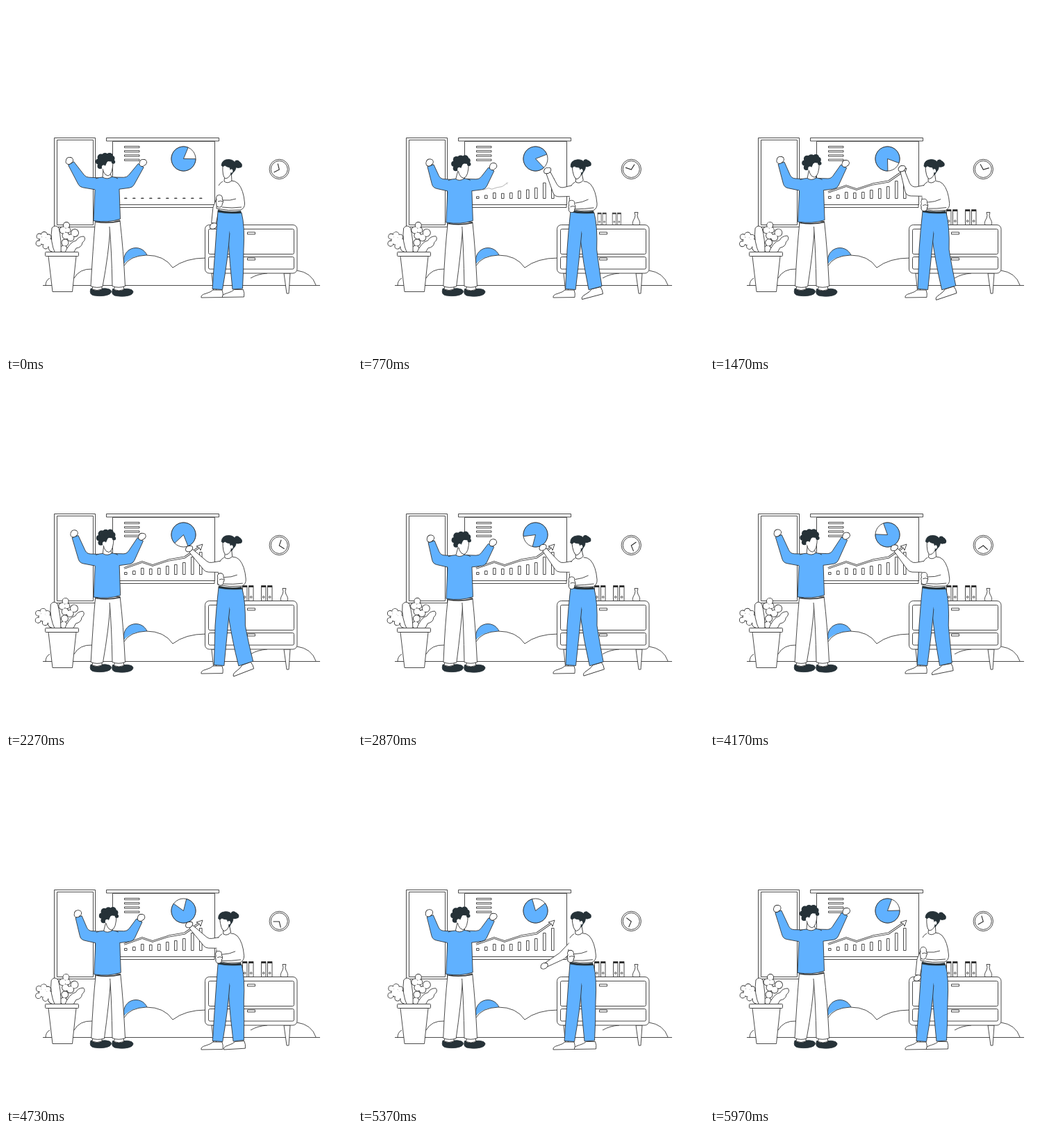
Animation of 498 by 500 pixels, one loop 6.01 s. Source, as an HTML page with a canvas:

```html
<!DOCTYPE html>
<html lang="en">
<head>
<meta charset="utf-8">
<title>Team presentation</title>
<style>
html, body { margin: 0; width: 100%; height: 100%; overflow: hidden; background: #fff; }
canvas { display: block; width: 498px; height: 500px; }
</style>
</head>
<body>
<canvas id="stage" width="498" height="500"></canvas>
<script>
const ctx = document.getElementById('stage').getContext('2d');
const LOOP = 6010, TAU = Math.PI * 2;
const BLUE = '#60b1ff', DARK = '#263238', INK = '#2c2c2c', WHITE = '#fff', LINE = .85;

const mix = (a, b, u) => a + (b - a) * u;
function ease(t, from, to) {
  const u = Math.min(1, Math.max(0, (t - from) / (to - from)));
  return u < .5 ? 2 * u * u : 1 - 2 * (1 - u) * (1 - u);
}
function keyed(t, keys) {
  let i = 1;
  while (i < keys.length - 1 && t > keys[i][0]) i++;
  const [t0, a] = keys[i - 1], [t1, b] = keys[i];
  return mix(a, b, Math.min(1, (t - t0) / (t1 - t0)));
}

function paint(fill, line = INK, width = LINE) {
  if (fill) { ctx.fillStyle = fill; ctx.fill(); }
  if (line) { ctx.strokeStyle = line; ctx.lineWidth = width; ctx.stroke(); }
}
function shape(d, fill, line, width = LINE) {
  const p = new Path2D(d);
  if (fill) { ctx.fillStyle = fill; ctx.fill(p); }
  if (line) { ctx.strokeStyle = line; ctx.lineWidth = width; ctx.stroke(p); }
}
function box(x, y, w, h, fill = WHITE, r = 0, width = LINE) {
  ctx.beginPath();
  ctx.roundRect(x, y, w, h, r);
  paint(fill, INK, width);
}
function oval(x, y, rx, ry = rx, fill = WHITE, line = INK) {
  ctx.beginPath();
  ctx.ellipse(x, y, rx, ry, 0, 0, TAU);
  paint(fill, line);
}
// Union of discs sharing one outline.
function lobes(list, fill = WHITE, line = INK) {
  for (const [x, y, r] of list) oval(x, y, r + .4, r + .4, line, null);
  for (const [x, y, r] of list) oval(x, y, r - .45, r - .45, fill, null);
}
function at(x, y, angle, scale, draw) {
  ctx.save();
  ctx.translate(x, y);
  ctx.rotate(angle);
  ctx.scale(scale, scale);
  ctx.translate(-x, -y);
  draw();
  ctx.restore();
}
function moved(x, y, draw) {
  ctx.save();
  ctx.translate(x, y);
  draw();
  ctx.restore();
}
// Tapered two-part limb through three joints.
function limb(a, b, c, widths, fill) {
  const unit = (p, q) => {
    const x = q[0] - p[0], y = q[1] - p[1], l = Math.hypot(x, y) || 1;
    return [-y / l, x / l];
  };
  const n1 = unit(a, b), n2 = unit(b, c);
  const sx = n1[0] + n2[0], sy = n1[1] + n2[1], sl = Math.hypot(sx, sy) || 1;
  const nb = [sx / sl * 1.15, sy / sl * 1.15];
  const off = (p, n, w, side) => [p[0] + n[0] * w / 2 * side, p[1] + n[1] * w / 2 * side];
  const [wa, wb, wc] = widths;
  ctx.beginPath();
  ctx.moveTo(...off(a, n1, wa, 1));
  ctx.arcTo(...off(b, nb, wb, 1), ...off(c, n2, wc, 1), 9);
  ctx.lineTo(...off(c, n2, wc, 1));
  ctx.lineTo(...off(c, n2, wc, -1));
  ctx.arcTo(...off(b, nb, wb, -1), ...off(a, n1, wa, -1), 9);
  ctx.lineTo(...off(a, n1, wa, -1));
  paint(fill);
}
function toward(p, q, d) {
  const x = q[0] - p[0], y = q[1] - p[1], l = Math.hypot(x, y);
  return [p[0] + x / l * d, p[1] + y / l * d];
}
function fist([x, y]) {
  lobes([[x, y, 4.6], [x - 1, y + 1.5, 4], [x + 1.5, y - .5, 4]]);
}

function room() {
  box(69.5, 189.5, 59, 128);
  box(73.5, 192.5, 52, 122);
  box(153.5, 194.5, 147, 91);
  shape('M153 289.5H300V285', null, INK);
  box(144.5, 189.5, 162, 4.5);
  for (let i = 0; i < 4; i++) box(170.5, 201.5 + i * 6.2, 21.5, 2.2);
}
function pie(turn) {
  const a = turn - TAU / 4 + .39, b = a + 1.19;
  oval(255.5, 219.5, 17.5);
  ctx.beginPath();
  ctx.moveTo(255.5, 219.5);
  ctx.arc(255.5, 219.5, 17.5, b, a + TAU);
  ctx.closePath();
  paint(BLUE);
}
function chart(t) {
  const grow = ease(t, 0, 1000);
  [3, 5, 9, 8, 9, 12, 14, 17, 25, 32].forEach((h, i) => {
    const tall = Math.max(.5, h * grow);
    box(170.5 + i * 12, 276.5 - tall, 3.6, tall);
  });
  const u = ease(t, 450, 1250);
  if (!u) return;
  ctx.globalAlpha = Math.min(1, u * 1.4);
  at(184, 263, 0, u, () => {
    const d = 'M170 267.5L196 258.5L211 263.5L234 256L257 252L280 236';
    ctx.lineJoin = 'round';
    shape(d, null, INK, 2.8);
    shape(d, null, WHITE, 1.3);
    shape('M274 236L283 233L280 242L278.5 238.5Z', WHITE, INK);
  });
  ctx.globalAlpha = 1;
}
function clock(turn) {
  oval(393.3, 234.5, 14.2);
  oval(393.3, 234.5, 12);
  at(393.3, 235, turn, 1, () => shape('M385.5 239L393.3 235L391.2 226.5', null, INK, 1.1));
}
function hills() {
  oval(187, 365, 17.5, 17.5, BLUE);
  shape('M168 402V373Q177 359 202 358Q228 358 240 376Q258 362 288 362V402Z', WHITE);
  shape('M170 373Q178 359 202 358Q228 358 240 376Q258 362 288 362', null, INK);
  shape('M57 402Q57 394 63 391M98 391Q106 377 124 378M352 391Q362 385 376 384M419 380Q440 383 446 401', null, INK);
  shape('M53 401.5H452', null, INK);
}
function cabinet(t) {
  shape('M400 384L404 413H407L409 384Z', WHITE, INK);
  shape('M296 384L299 413H302L305 384Z', WHITE, INK);
  const books = ease(t, 300, 1000), vase = ease(t, 100, 750);
  if (books) at(361.5, 314, 0, books, () => {
    for (const x of [340.5, 349.5, 367.5, 376.5]) {
      box(x, 292.5, 6.5, 22);
      shape(`M${x} 294h6.5`, null, INK, 2);
      oval(x + 3.2, 309, 1.3);
    }
  });
  if (vase) at(400.5, 315, 0, vase, () =>
    shape('M398 296.5H403Q401 301 403 305Q407 311 405 314.5H396Q394 311 398 305Q400 301 398 296.5Z', WHITE, INK));
  box(286.5, 314.5, 132.5, 69.5, WHITE, 6);
  box(291.5, 320.5, 123, 36, WHITE, 2);
  box(291.5, 360.5, 123, 17.5, WHITE, 2);
  box(347.5, 325, 11, 3);
  box(347.5, 362, 11, 3);
}
function plant(t) {
  const sway = -.065 * (1 - Math.cos(TAU * t / LOOP)) / 2;
  at(80, 357, sway * .6, 1, () =>
    lobes([[87, 315, 4.5], [82, 322, 5], [89, 322, 4], [86, 330, 5], [99, 326, 5.5], [93, 333, 5], [85, 340, 5], [83, 349, 5]]));
  at(82, 357, sway, 1, () =>
    shape('M84 356Q91 339 101 337Q104 331 112 331Q116 335 110 340Q109 347 101 348Q98 355 94 356Z', WHITE, INK));
  at(70, 357, sway, 1, () =>
    lobes([[48, 331, 4], [55, 329, 4.5], [61, 332, 4], [47, 341, 4], [54, 337, 6], [62, 340, 6], [57, 345, 4], [67, 347, 6], [71, 353, 5]]));
  at(75, 357, sway * .8, 1, () =>
    shape('M71 356Q63 338 66 319Q71 313 76 319Q80 336 79 356Z', WHITE, INK));
  shape('M61 359.5L67 410.5H95.5L101 359.5Z', WHITE, INK);
  box(56.5, 353.5, 48, 6, WHITE, 1);
}

function man(t, s) {
  const first = t < 1000 ? (1 + Math.cos(Math.PI * t / 1000)) / 2 : 0;
  const dx = s, dy = 2.8 * s;
  const shoe = () => {
    shape('M122 406Q119 415 127 416Q141 418 149 414Q154 410 149 407Q143 405 138 406Z', DARK, DARK);
    shape('M125 402L124 407Q131 410 138 407V402Z', WHITE, INK);
  };
  shoe();
  moved(31.5, .5, shoe);
  const hip = 308 + dy;
  shape(`M${128.5 + dx} ${hip}Q125 350 ${122 + s} 402.5Q131 406 ${139 + s * 3} 403Q148 355 ${150 + dx} 318V${hip}Z`, WHITE, INK);
  shape(`M${148 + dx} ${hip}L${149 + dx} 318Q152 350 153 402.5Q162 406 171.5 402.5Q169 350 ${164 + dx} ${hip}Z`, WHITE, INK);
  shape(`M${149 + dx} ${hip}V317`, null, WHITE, 3);
  shape(`M${129 + dx} ${hip + 2}Q147 ${hip + 5} ${164 + dx} ${hip + 1}`, null, INK, 1.5);

  const left = [96.5 + 8 * s - 5.5 * first, 216 + 9 * s + 6 * first];
  const right = [196 - 2 * s + first, 220 + 11 * s + 5 * first];
  const elbowL = [110.5 + 3 * s, 253 + 2 * s], elbowR = [178 + s, 253.5 + 3 * s];
  limb([136 + dx, 256 + dy], elbowL, toward(left, elbowL, 5), [18, 14.5, 9.5], BLUE);
  limb([156 + dx, 255 + dy], elbowR, toward(right, elbowR, 5), [18, 14.5, 9.5], BLUE);
  fist(left);
  fist(right);

  moved(dx, dy, () => {
    shape('M129 248Q135 246 139 246L153 245.5Q160 247 163 250L163 263L164.5 306Q147 312 126 309L128 264Z', BLUE);
    shape('M128 264L126 308.5Q147 312 164.5 306L163 263M129 248Q135 246 139 246L153 245.5Q158 246 161 248', null, INK);
  });

  const hx = 6 * s, hy = 3.8 * s;
  shape(`M${140 + hx * .7} ${234 + hy}L${139 + dx * 2} ${246 + dy}Q146 ${250 + dy} ${152 + dx} ${245.5 + dy}L${149 + hx} ${238 + hy}Z`, WHITE, INK);
  moved(hx, hy, () => {
    shape('M138 222Q138 243 147 244Q154 242 154 222Z', WHITE, INK);
    shape('M132 217L138 214H152L155 224L146 223L141 234L134 230Z', DARK);
    lobes([[136.5, 217.5, 4.5], [142.5, 216, 4.5], [149, 215.8, 4.5], [152.5, 219, 3.6], [133, 223.5, 3.7],
      [138, 223, 4], [135.5, 230, 3.6], [144, 220, 4], [154.5, 224, 2.3]], DARK, DARK);
    oval(140.5, 231.5, 2.6, 3, WHITE, null);
  });
}

function reach(t) {
  const up = ease(t, 0, 900) * (1 - ease(t, 4900, 5700));
  const wave = t < 1500 ? 0 : (1 + Math.cos(TAU * (t - 2500) / 2000)) / 2;
  const polar = (p, deg, len) => [p[0] + Math.cos(deg * Math.PI / 180) * len, p[1] + Math.sin(deg * Math.PI / 180) * len];
  const shoulder = [308, 264];
  const elbow = polar(shoulder, mix(102, 172, up), mix(27, mix(22, 18, wave), up));
  const hand = polar(elbow, mix(99, mix(253, 222, wave), up), mix(26, mix(35, 38, wave), up));
  limb([313, 265], elbow, toward(hand, elbow, 4), [mix(10, 17, up), mix(8, 12, up), 6.5], WHITE);
  lobes([[hand[0], hand[1], 4.1], [hand[0] - 1.5, hand[1] + 1, 3.4], [hand[0] + 2, hand[1] - 1, 3.3]]);
}
function woman(t, s) {
  const k = keyed(t, [[0, 0], [770, 11], [1470, 14], [2270, 16], [3170, 12], [3830, 12], [4730, 2], [5080, 0], [LOOP, 0]]);
  const lean = Math.min(1, k / 12);
  reach(t);
  const shoe = 'M281 419Q280 415 288 413Q295 411 298 408H311Q313 413 312 418.5Z';
  shape(shoe, WHITE, INK);
  at(327 + k, 415, -.022 * k, 1, () =>
    moved(30.5 + k * .9, -.5 - k * .08, () => shape(shoe, WHITE, INK)));
  const hemL = 326 + .55 * k, hemR = 340.5 + .95 * k;
  const hip = 1 + lean;
  shape(`M320 297L${338 + hip} 297Q${343 + hip} 316 ${342 + k * .15} 350Q${342 + k * .5} 380 ${hemR} ${406 - .3 * k}L${hemL} ${407 + .06 * k}Q${322 + k * .2} 370 320 335Z`, BLUE, INK);
  shape(`M${304 + hip} 295Q303 320 301 350L${297 + .15 * k} 406.5L${311.5 + .15 * k} 407.5Q${320 - k * .1} 360 322 325L328 297Z`, BLUE, INK);
  shape('M321 298H332L328 318L322 327Z', BLUE);
  moved(lean, 0, () => shape('M305 293Q320 297 338 294.5L338.5 297.5Q319 299 305 296Z', DARK, DARK, .5));

  moved(lean * 2 - 1.5 * s, s, () => {
    shape('M312 252Q305 256 305 263L303 291Q320 295 338 293Q344 290 343.5 283Q342 264 334 255Q330 251 324 251Z', WHITE);
    shape('M312 252Q308 254 306 258M304 274L303 291Q320 295 338 293Q344 290 343.5 283Q342 264 334 255Q330 251 324 251', null, INK);
    const fy = 5.5 * s + lean * 2;
    shape(`M331 277Q323 ${280 + fy * .2} 312 ${279 + fy * .5}M339 289Q325 291 311 ${289 + fy * .3}`, null, INK);
    lobes([[307, 276 + fy, 4.4], [307.5, 281 + fy, 5], [307, 285 + fy, 4.2]]);
    shape(`M305 ${281 + fy}q4 -2 7 0`, null, INK);
  });

  moved(lean - 2 * s, s * .5, () => at(318, 250, -.17 * s, 1, () => {
    shape('M315 241L314 252Q319 256 325 251L324 236Z', WHITE, INK);
    shape('M312 228Q311 246 316 248Q323 247 326 235L324 226Z', WHITE, INK);
    shape('M310 229Q311 220 321 220.5Q329 221 331 228Q332 235 327 239L324 243Q324 236 322 232Q317 231 315 229Q312 232 310 229Z', DARK, DARK);
    lobes([[334, 228, 4.5], [332.5, 225, 3], [336.5, 229, 3], [330, 229, 3]], DARK, DARK);
    oval(324.5, 237, 2, 2.7, WHITE, null);
  }));
}

function draw(t) {
  const turn = TAU * t / LOOP;
  const sway = (1 - Math.cos(3 * turn)) / 2;
  ctx.fillStyle = WHITE;
  ctx.fillRect(0, 0, 498, 500);
  room();
  pie(turn);
  chart(t);
  clock(turn);
  hills();
  cabinet(t);
  plant(t);
  man(t, sway);
  woman(t, sway);
}
const start = performance.now();
function tick() {
  draw((performance.now() - start) % LOOP);
  requestAnimationFrame(tick);
}
tick();
</script>
</body>
</html>
```
